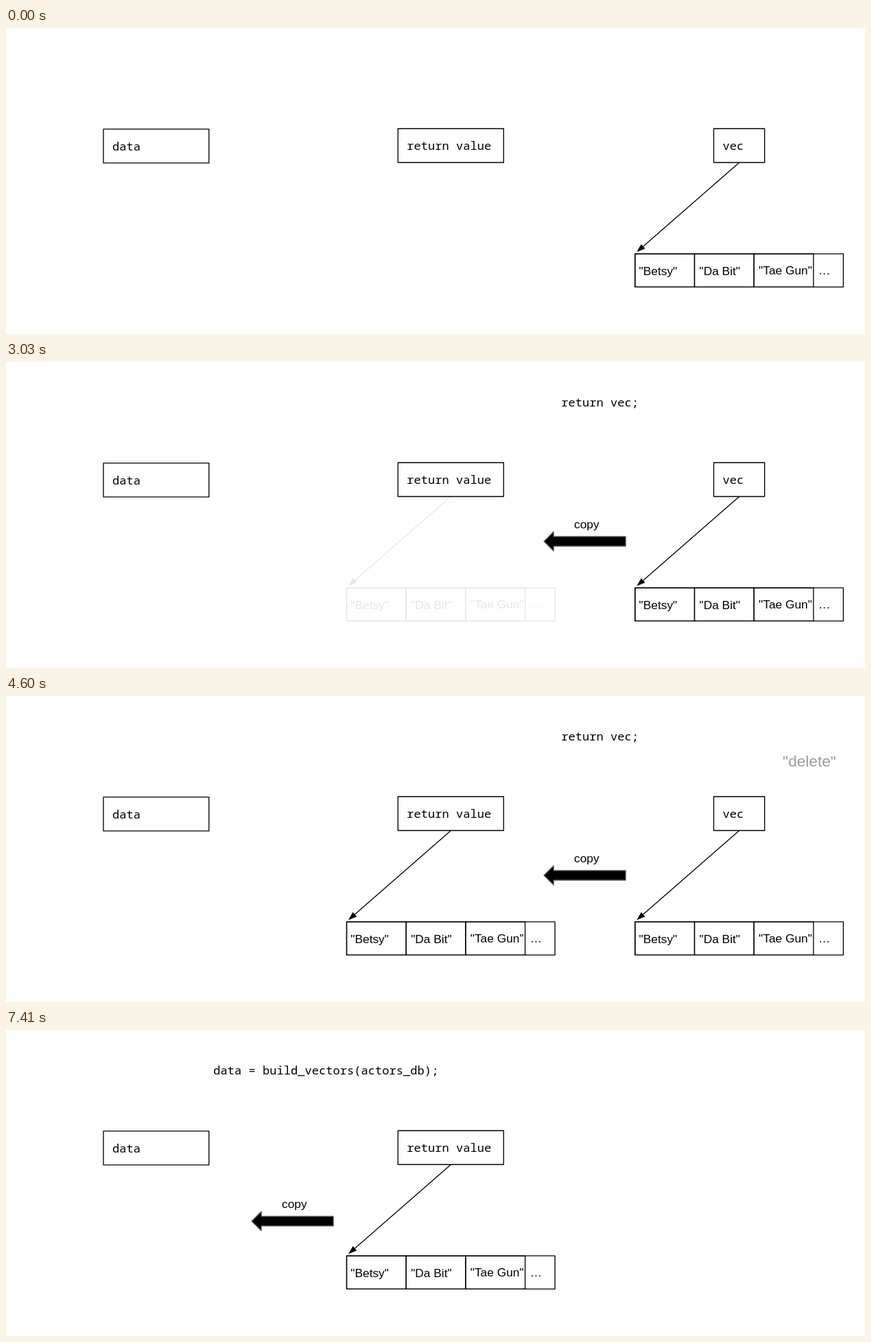
Write an HTML page that moves like this. It is 1252 px wide and 447 px high and loops after 8 s.

```html
<!DOCTYPE html>
<html lang="en">
<head>
<meta charset="utf-8">
<title>Returning a vector by copy</title>
<style>
  html, body { margin: 0; width: 100%; height: 100%; overflow: hidden; background: #fefefe; }
  svg { display: block; }
  text { font: 17.33px "Liberation Sans", Arial, sans-serif; }
  .code { font: 17.1px "Noto Sans Mono", "DejaVu Sans Mono", monospace; }
  .big { font-size: 22.67px; }
  .line { fill: none; stroke: #000; stroke-width: 1.33; stroke-linejoin: round; }
  .block { stroke: #595959; stroke-width: 1.33; stroke-linejoin: round; }
</style>
</head>
<body>
<svg id="stage" width="1252" height="447" viewBox="0 0 1252 447"></svg>
<script>
const LOOP = 8000;
const STEP = 77.5;
const stage = document.getElementById('stage');

const text = (x, y, s, cls = '') => `<text x="${x}" y="${y}" class="${cls}">${s}</text>`;
const rect = (x, y, w, h) => `<rect class="line" x="${x}" y="${y}" width="${w}" height="${h}"/>`;
const group = (id, body) => `<g id="${id}">${body}</g>`;
const box = (x, y, w, label) => rect(x, y, w, 49.5) + text(x + 13, y + 31.2, label, 'code');

function pointer(x1, y1, x2, y2) {
  const d = Math.hypot(x1 - x2, y1 - y2);
  const ux = (x1 - x2) / d, uy = (y1 - y2) / d;
  const bx = x2 + 12.5 * ux, by = y2 + 12.5 * uy, w = 4.4;
  return `<path class="line" d="M${x1} ${y1}L${bx} ${by}"/>` +
    `<path d="M${x2} ${y2}L${bx - w * uy} ${by + w * ux}L${bx + w * uy} ${by - w * ux}Z"/>`;
}

// Heap array whose left edge is x, with the pointer leading to it.
function heap(x) {
  const cell = 86.7, y = 329.9, h = 48.5;
  return pointer(x + 151.7, 196.8, x + 2.5, 327.2) +
    rect(x, y, 303.6, h) +
    [0, 1, 2].map(i => rect(x + i * cell, y, cell, h)).join('') +
    text(x + 5.8, 361, '"Betsy"') +
    text(x + 93.7, 361, '"Da Bit"') +
    text(x + 180.3, 360, '"Tae Gun"') +
    text(x + 267.2, 360, '…');
}

const copyArrow = (x, y) =>
  `<path class="block" d="M${x} ${y}l14 -14v7h105v14h-105v7Z"/>` +
  text(x + 43.9, y - 19, 'copy');

stage.innerHTML =
  box(142, 147.7, 153.8, 'data') +
  box(571.3, 147, 154, 'return value') +
  group('vec', box(1031.5, 147, 74.2, 'vec') + heap(916.8)) +
  group('result', heap(496.5)) +
  group('returnLine', text(809.2, 65, 'return vec;', 'code')) +
  group('assignLine', text(302.2, 65, 'data = build_vectors(actors_db);', 'code')) +
  group('copyOut', copyArrow(784.1, 262)) +
  group('copyIn', copyArrow(358.1, 279.2)) +
  group('del', text(1132.1, 103, '"delete"', 'big'));

const parts = {};
stage.querySelectorAll('g').forEach(g => { parts[g.id] = g; });

const during = (t, from, to) => t >= from && t < to ? 1 : 0;

// Linear fade in that advances once per STEP.
function fade(t, start, steps) {
  const k = Math.floor((t - start) / STEP) + 1;
  return Math.min(1, Math.max(0, k / steps));
}

function draw(t) {
  const leaving = t < 5450 ? 1 : t < 6400 ? 0.66 : 0;
  const opacity = {
    returnLine: during(t, 700, 6400),
    assignLine: during(t, 6400, LOOP),
    copyOut: during(t, 1860, 6400),
    copyIn: during(t, 7410, LOOP),
    result: fade(t, 3030, 11),
    del: fade(t, 4290, 13) * leaving,
    vec: leaving
  };
  for (const id in opacity) parts[id].setAttribute('opacity', opacity[id]);
}

let origin;
function tick(now) {
  origin ??= now;
  draw((now - origin) % LOOP);
  requestAnimationFrame(tick);
}
draw(0);
requestAnimationFrame(tick);
</script>
</body>
</html>
```
